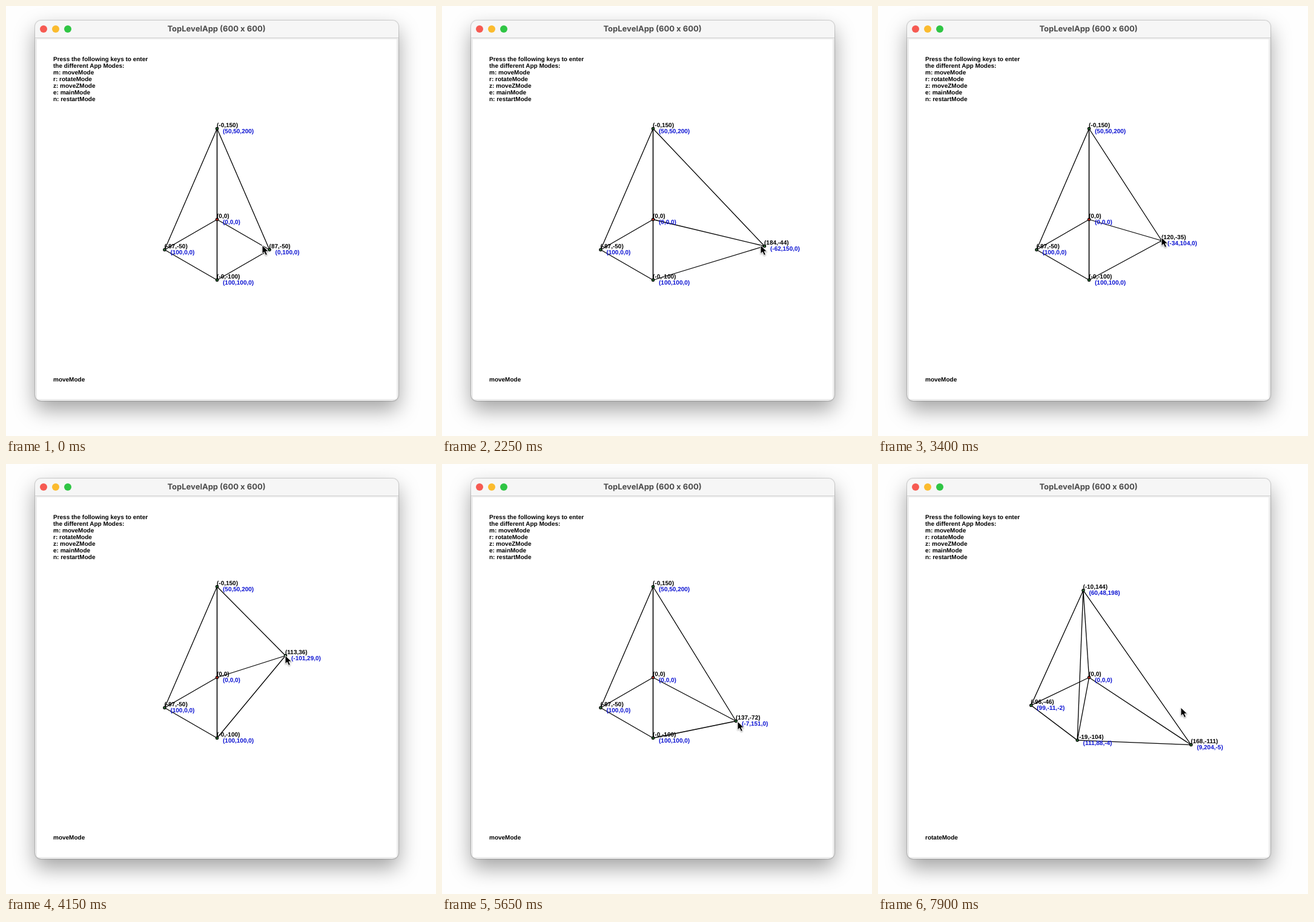
An HTML page that plays this animation: 710x710 px, repeating every 8 s.

```html
<!DOCTYPE html>
<html lang="en">
<head>
<meta charset="utf-8">
<title>TopLevelApp</title>
<style>
html, body { margin: 0; width: 100%; height: 100%; overflow: hidden; background: #fefefe; }
.window {
  position: absolute; left: 48px; top: 24px; width: 600px; height: 628px;
  border-radius: 10px; background: #ececec;
  box-shadow: 0 0 1px 1px rgba(0,0,0,.17), 0 15px 34px rgba(0,0,0,.36);
  overflow: hidden;
}
.bar { height: 28px; background: #f6f6f6; border-bottom: 1px solid #d2d2d2; }
.page { position: absolute; left: 3px; top: 31px; width: 594px; height: 594px; background: #fff; }
svg { position: absolute; left: 0; top: 0; }
text {
  font: bold 10px "Liberation Sans", Arial, sans-serif;
  white-space: pre; text-rendering: geometricPrecision;
}
.title { font: 700 13px Inter, sans-serif; fill: #4b4b4b; text-anchor: middle; }
.world { fill: #0b12d2; }
.edge { stroke: #000; stroke-width: 1.3; }
.dot { stroke: #000; stroke-width: 1.2; }
</style>
</head>
<body>
<div class="window"><div class="bar"></div><div class="page"></div></div>
<svg id="stage" width="710" height="710" viewBox="0 0 710 710"></svg>
<script>
const LOOP = 8000, STEP = 50;
const CX = 348.5, CY = 352.5, COS30 = Math.sqrt(3) / 2;
const GRAB = 1300, DROP = 6700;
const stage = document.getElementById("stage");

function add(tag, attrs, text = "") {
  const el = document.createElementNS("http://www.w3.org/2000/svg", tag);
  set(el, attrs);
  el.textContent = text;
  return stage.appendChild(el);
}
function set(el, attrs) {
  for (const key in attrs) el.setAttribute(key, attrs[key]);
}
const clamp = (v, lo, hi) => Math.min(hi, Math.max(lo, v));

// pointer stops: time, then x and y from the origin, y up
const STOPS = [
  [0, 75, -43],
  [800, 87, -50],
  [GRAB, 87, -50],
  [2200, 184, -44],
  [3000, 88, -32],
  [3250, 88, -32],
  [3350, 120, -35],
  [4100, 113, 36],
  [4300, 113, 36],
  [5600, 137, -72],
  [6400, 188, -95],
  [DROP, 188, -95],
  [6750, 187, -81],
  [7050, 182, -44],
  [7550, 182, -44],
  [7900, 152, -50],
  [LOOP, 152, -50]
];
const SPIN = [-0.023, 0.02, -0.112];

// the square base with its diagonal, and the apex joined to every corner
const EDGES = [[0, 1], [1, 3], [3, 2], [2, 0], [0, 3], ...[0, 1, 2, 3].map(i => [4, i])];

function pointerAt(t) {
  const i = STOPS.findIndex(s => s[0] > t);
  const [t0, x0, y0] = STOPS[i - 1], [t1, x1, y1] = STOPS[i];
  const f = (t - t0) / (t1 - t0);
  return [x0 + (x1 - x0) * f, y0 + (y1 - y0) * f].map(Math.round);
}

// isometric projection and its inverse on the ground plane
const project = ([x, y, z]) => [(y - x) * COS30, z - (x + y) / 2];
const unproject = ([x, y]) => [-y - x / COS30 / 2, -y + x / COS30 / 2, 0];
const label = nums => "(" + nums.map(n => n.toFixed(0)).join(",") + ")";

// the dragged corner trails the pointer by one step
function draggedCorner(t) {
  const held = t - STEP;
  return held <= GRAB ? [0, 100, 0] : unproject(pointerAt(Math.min(held, DROP)));
}

const cross = (a, b) => [
  a[1] * b[2] - a[2] * b[1],
  a[2] * b[0] - a[0] * b[2],
  a[0] * b[1] - a[1] * b[0]
];
function rotate(p, w) {
  const u = cross(w, p), v = cross(w, u);
  return p.map((c, i) => c + u[i] + v[i] / 2);
}

["#f65a52", "#fbbb2e", "#2fc544"].forEach((fill, i) =>
  add("circle", { cx: 62 + 20 * i, cy: 38, r: 6, fill }));
add("text", { class: "title", x: 347.5, y: 42.3 }, "TopLevelApp (600 x 600)");
[
  "Press the following keys to enter",
  "the different App Modes:",
  "m: moveMode",
  "r: rotateMode",
  "z: moveZMode",
  "e: mainMode",
  "n: restartMode"
].forEach((line, i) => add("text", { x: 78, y: 91 + 11 * i }, line));
const mode = add("text", { x: 78, y: 620 });

const edges = EDGES.map(() => add("line", { class: "edge" }));
const corners = [0, 1, 2, 3, 4].map(i => ({
  dot: add("circle", { class: "dot", r: 2.1, fill: i ? "#2f7a3a" : "#d8362a" }),
  flat: add("text", {}),
  world: add("text", { class: "world" })
}));
const pointer = add("path", {
  d: "M0 0V14.2L3.3 11.2 5.7 16.6 8.5 15.4 6.1 10.2H10.6Z",
  fill: "#000", stroke: "#fff", "stroke-width": 1, "stroke-linejoin": "round",
  style: "filter:drop-shadow(0 1px 1px rgba(0,0,0,.35))"
});

function draw(t) {
  const turn = clamp((t - 7550) / 350, 0, 1);
  const spin = SPIN.map(w => w * turn);
  const points = [[0, 0, 0], [100, 0, 0], draggedCorner(t), [100, 100, 0], [50, 50, 200]]
    .map(p => rotate(p, spin));
  const flat = points.map(project);
  // centred corners carry a tiny negative offset and read "-0"
  flat[3][0] -= 1e-9;
  flat[4][0] -= 1e-9;
  const screen = flat.map(([x, y]) => [CX + x, CY - y]);

  edges.forEach((el, i) => {
    const [a, b] = EDGES[i].map(n => screen[n]);
    set(el, { x1: a[0], y1: a[1], x2: b[0], y2: b[1] });
  });
  corners.forEach((c, i) => {
    const [x, y] = screen[i];
    set(c.dot, { cx: x, cy: y });
    set(c.flat, { x: x - .5, y: y - 2.5 });
    set(c.world, { x: x + 9.5, y: y + 7.5 });
    c.flat.textContent = label(flat[i]);
    c.world.textContent = label(points[i]);
  });
  mode.textContent = t < 7000 ? "moveMode" : t < 7300 ? "mainMode" : "rotateMode";
  const [px, py] = pointerAt(t);
  set(pointer, { transform: `translate(${CX + px - .5} ${CY - py - .5})` });
}

const start = performance.now();
function tick() {
  const t = (performance.now() - start) % LOOP;
  draw(Math.floor(t / STEP) * STEP);
  requestAnimationFrame(tick);
}
tick();
</script>
</body>
</html>
```
